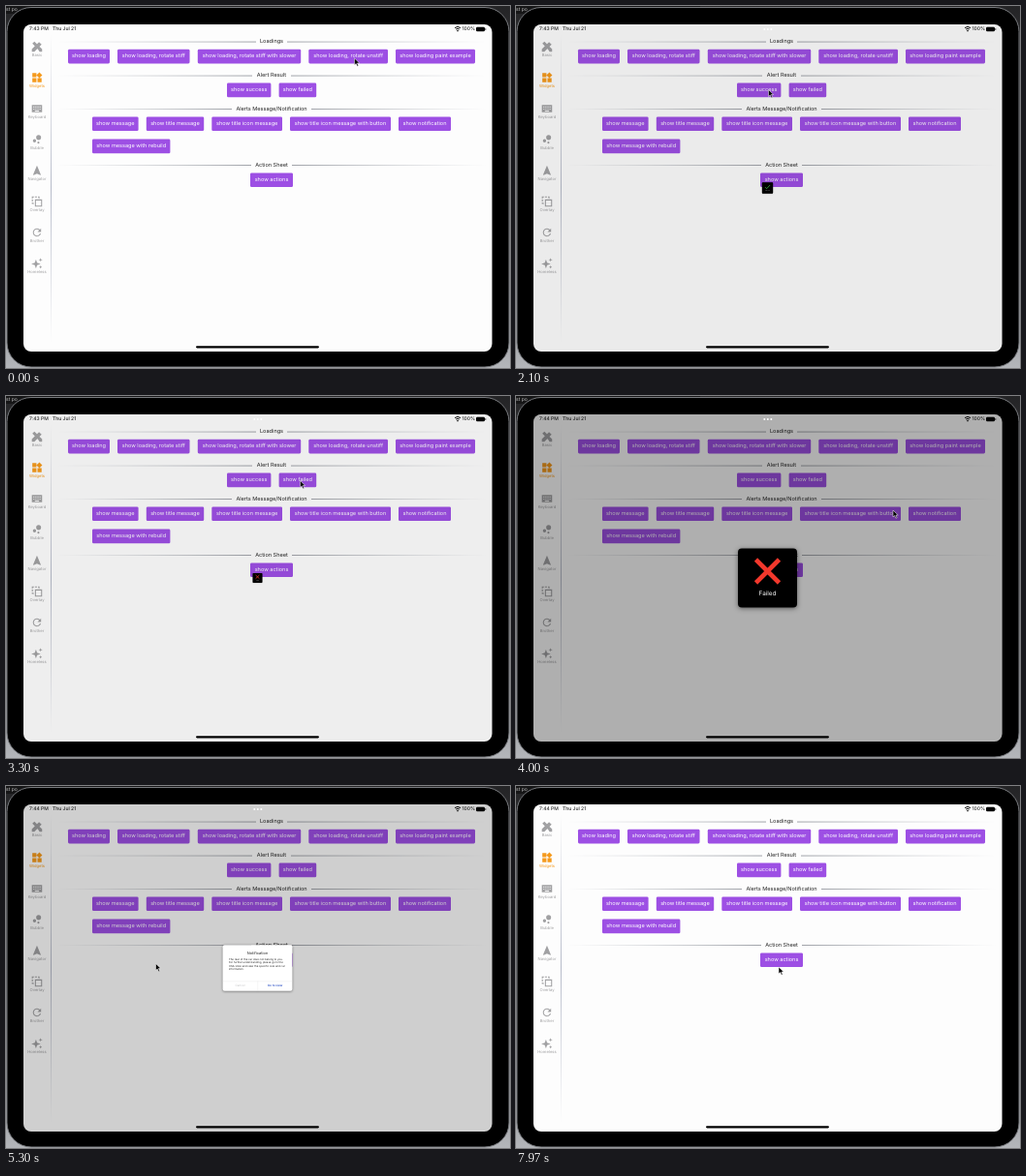
These frames come from a looping animation (520 px wide and 374 px high, 8000 ms). An HTML page:

```html
<!DOCTYPE html>
<html lang="en">
<head>
<meta charset="utf-8">
<title>Widget gallery</title>
<style>
  html, body { margin: 0; width: 100%; height: 100%; overflow: hidden; background: #222; }
  svg { display: block; width: 100vw; height: 100vh; }
  text { font-family: Inter, Roboto, sans-serif; font-size: 5.58px; dominant-baseline: central; text-rendering: geometricPrecision; }
  .popup { filter: drop-shadow(0 1px 2.5px rgba(0, 0, 0, .5)); }
</style>
</head>
<body>
<svg id="stage" viewBox="0 0 520 374">
  <defs>
    <linearGradient id="desk" x2="0" y2="1">
      <stop offset="0" stop-color="#242426"/><stop offset=".5" stop-color="#55565a"/><stop offset="1" stop-color="#b4b6ba"/>
    </linearGradient>
    <linearGradient id="fadeIn"><stop stop-color="#9aa0aa" stop-opacity="0"/><stop offset="1" stop-color="#777b84"/></linearGradient>
    <linearGradient id="fadeOut"><stop stop-color="#777b84"/><stop offset="1" stop-color="#9aa0aa" stop-opacity="0"/></linearGradient>
    <linearGradient id="fadeBoth" x2="0" y2="1">
      <stop stop-color="#a4aabc" stop-opacity="0"/><stop offset=".5" stop-color="#a4aabc"/><stop offset="1" stop-color="#a4aabc" stop-opacity="0"/>
    </linearGradient>
    <clipPath id="screenClip"><rect x="18" y="19" width="483.5" height="338" rx="8"/></clipPath>
  </defs>
  <rect width="520" height="374" fill="url(#desk)"/>
  <rect width="190" height="8" fill="#161617"/>
  <rect x="1" y="1.5" width="518" height="371.5" rx="25" fill="#000" stroke="#77797d" stroke-width="1"/>
  <text x="0" y="4" fill="#bbb" style="font-size:5px">st po</text>
  <g clip-path="url(#screenClip)">
    <rect x="18" y="19" width="484" height="338" fill="#fdfdfd"/>
    <g id="page"></g>
    <rect id="dim" x="18" y="19" width="484" height="338"/>
    <g fill="#fff"><circle cx="256.3" cy="24" r="1"/><circle cx="259.8" cy="24" r="1"/><circle cx="263.3" cy="24" r="1"/></g>
    <rect x="196" y="351.2" width="127" height="2.3" rx="1.15"/>
    <g id="popups"></g>
    <path id="cursor" d="M0 0V7L1.7 5.5 2.9 8.2 4.1 7.7 2.9 5H5.2Z" stroke="#fff" stroke-width=".5"/>
  </g>
</svg>
<script>
const LOOP = 8000;
const PURPLE = '#9d4fe4', GREY = '#a1a1a3', ORANGE = '#f59a1c', BLUE = '#3478e0';
const byId = id => document.getElementById(id);

function add(parent, tag, attrs, content = '') {
  const node = document.createElementNS('http://www.w3.org/2000/svg', tag);
  for (const key in attrs) node.setAttribute(key, attrs[key]);
  node.textContent = content;
  parent.appendChild(node);
  return node;
}

function label(parent, x, y, content, { size = 5.58, fill = '#222', anchor = 'middle', weight = 400 } = {}) {
  return add(parent, 'text', { x, y, fill, 'text-anchor': anchor, style: `font-size:${size}px;font-weight:${weight}` }, content);
}

const page = byId('page');

// Status bar
const clock = label(page, 24, 24, '', { size: 5, anchor: 'start', weight: 500 });
label(page, 48, 24, 'Thu Jul 21', { size: 5, anchor: 'start', weight: 500 });
label(page, 470.5, 24, '100%', { size: 5, anchor: 'start', weight: 500 });
add(page, 'path', { d: 'M463 22.6Q466 20.2 469 22.6M464.2 24.1Q466 22.6 467.8 24.1', fill: 'none', stroke: '#111', 'stroke-width': 1 });
add(page, 'circle', { cx: 466, cy: 25.6, r: .8 });
add(page, 'rect', { x: 485, y: 21.8, width: 9, height: 4.4, rx: 1.2 });
add(page, 'rect', { x: 494.4, y: 23.2, width: .8, height: 1.6 });

// Sidebar, icons on a 24-unit grid
const sidebar = [
  ['Basic', 'M3 6 7 2 12 7 8 11ZM13 16 17 12 22 17V22H17ZM2 17 16 3 21 8 7 22H2Z'],
  ['Widgets', 'M13 13v8h8v-8zM3 21h8v-8H3zM3 3v8h8V3zM16.7 1.7 11 7.3 16.7 13l5.6-5.7z'],
  ['Keyboard', 'M2 5H22V19H2ZM5 8V10H7V8ZM9 8V10H11V8ZM13 8V10H15V8ZM17 8V10H19V8ZM5 12V14H7V12ZM9 12V14H11V12ZM13 12V14H15V12ZM17 12V14H19V12ZM8 16V17.5H16V16Z'],
  ['Bubble', 'M4 14.4a3.2 3.2 0 1 0 6.4 0a3.2 3.2 0 1 0-6.4 0M12.8 18a2 2 0 1 0 4 0a2 2 0 1 0-4 0M10.4 8a4.8 4.8 0 1 0 9.6 0a4.8 4.8 0 1 0-9.6 0'],
  ['Navigator', 'M12 2 4.5 20.3 5.2 21 12 18 18.8 21 19.5 20.3Z'],
  ['Overlay', 'M8 8H22V22H8ZM10 10V20H20V10ZM2 2H6V4H4V6H2ZM8 2H12V4H8ZM14 2H17V6H15V4H14ZM2 8H4V12H2ZM2 14H4V15H6V17H2Z'],
  ['Brother', 'M17.7 6.3A8 8 0 1 0 19.7 14H17.6A6 6 0 1 1 16.2 7.8L13 11H20V4Z'],
  ['Homeless', 'M10 4 12.2 10.8 19 13 12.2 15.2 10 22 7.8 15.2 1 13 7.8 10.8ZM19 1 20 4 23 5 20 6 19 9 18 6 15 5 18 4ZM19 16 20 18 22 19 20 20 19 22 18 20 16 19 18 18Z'],
];
sidebar.forEach(([name, d], i) => {
  const y = 42 + i * 32, fill = name === 'Widgets' ? ORANGE : GREY;
  add(page, 'path', { d, fill, 'fill-rule': 'evenodd', transform: `translate(25.6 ${y - 6.4}) scale(.53)` });
  label(page, 32, y + 9.8, name, { size: 4.15, fill });
});
add(page, 'rect', { x: 46.2, y: 28, width: .8, height: 320, fill: 'url(#fadeBoth)' });

// Section headings: text, y, half the gap between the rules
for (const [name, y, gap] of [['Loadings', 37, 16], ['Alert Result', 72, 20], ['Alerts Message/Notification', 106.5, 41], ['Action Sheet', 164.5, 21]]) {
  add(page, 'rect', { x: 52, y: y - .3, width: 222 - gap, height: .7, fill: 'url(#fadeIn)' });
  add(page, 'rect', { x: 274 + gap, y: y - .3, width: 222 - gap, height: .7, fill: 'url(#fadeOut)' });
  label(page, 274, y, name);
}

// Buttons: top, then [left, right, text]
const buttonRows = [
  [44.8, [64, 107, 'show loading'], [115, 189.5, 'show loading, rotate stiff'], [197.8, 304.2, 'show loading, rotate stiff with slower'],
    [312.3, 394, 'show loading, rotate unstiff'], [402, 484, 'show loading paint example']],
  [79.6, [228, 273.4, 'show success'], [281.6, 320.2, 'show failed']],
  [114.4, [89, 136.6, 'show message'], [144.8, 204.2, 'show title message'], [212.3, 285, 'show title icon message'],
    [293, 397, 'show title icon message with button'], [405, 459, 'show notification']],
  [137.6, [89, 169.4, 'show message with rebuild']],
  [172.4, [252, 296, 'show actions']],
];
for (const [top, ...buttons] of buttonRows) {
  for (const [left, right, name] of buttons) {
    add(page, 'rect', { x: left, y: top, width: right - left, height: 14.7, rx: 1.4, fill: PURPLE });
    label(page, (left + right) / 2, top + 7.3, name, { fill: '#fff' });
  }
}

// Popups are drawn around their own centre
const popups = [];
function popup(open, close, width, height, fill, dims) {
  const group = add(byId('popups'), 'g', { class: 'popup' });
  add(group, 'rect', { x: -width / 2, y: -height / 2, width, height, rx: 4, fill });
  popups.push({ group, open, close, dims });
  return group;
}
function toast(open, close, text, dims) {
  const group = popup(open, close, 61, 61, '#000', dims);
  label(group, 0, 15.5, text, { size: 6.4, fill: '#fff' });
  return group;
}
function actions(group, y, bottom, left, right, size) {
  add(group, 'path', { d: `M-73 ${y}H73M.5 ${y}V${bottom}`, stroke: '#ddd', 'stroke-width': .6 });
  label(group, -36.5, (y + bottom) / 2, left[0], { size, fill: left[1] });
  label(group, 36.5, (y + bottom) / 2, right[0], { size, fill: right[1], weight: right[2] });
}

const loading = toast(60, 620, 'Loading', false);
const spinner = add(loading, 'g', {});
for (let i = 0; i < 12; i++) {
  add(spinner, 'path', { d: 'M0-5V-10', stroke: '#fff', 'stroke-width': 1.8, 'stroke-linecap': 'round', opacity: .15 + i * .07, transform: `rotate(${i * 30})` });
}
const painting = toast(900, 1480, 'Loading', false);
const arc = add(painting, 'path', { d: 'M0-10A10 10 0 1 1-10 0', fill: 'none', stroke: '#fff', 'stroke-width': 2, 'stroke-linecap': 'round' });

const success = toast(2046, 2953, 'Success', true);
add(success, 'path', { d: 'M-13-4.5-5 4 14-16', fill: 'none', stroke: '#3fae49', 'stroke-width': 4.4 });
const failed = toast(3250, 4040, 'Failed', true);
add(failed, 'path', { d: 'M-12-19 12 5M12-19-12 5', stroke: '#f2382c', 'stroke-width': 4.6 });

const notice = popup(4450, 5200, 146, 96, '#fff', true);
label(notice, 0, -31, 'Notification', { size: 8 });
['The rear of the car does not belong to you.', 'For further understanding, please go to the', 'CSA store and view the specific size and car', 'information.']
  .forEach((line, i) => label(notice, -60, -17.5 + i * 6.9, line, { anchor: 'start' }));
actions(notice, 28, 48, ['Cancel', '#c4c4c6'], ['Go to view', '#3558c8', 600], 6.2);

const hola = popup(5880, 7560, 146, 109, '#fff', false);
label(hola, 0, -43.5, 'Hola', { size: 8.2, weight: 600 });
add(hola, 'circle', { cy: -17.5, r: 13.5, fill: '#3fa142' });
add(hola, 'circle', { cy: -23.3, r: 1.7, fill: '#fff' });
add(hola, 'rect', { x: -1.4, y: -19.5, width: 2.8, height: 9.3, fill: '#fff' });
label(hola, -66, 7.5, 'A view of the sea when the author was a', { size: 6.2, anchor: 'start' });
label(hola, -66, 15.5, 'child made the author invisibly.', { size: 6.2, anchor: 'start' });
actions(hola, 33.5, 54.5, ['OK', BLUE], ['Next One', BLUE, 400], 6.4);

// Pointer path: time, x, y
const pointer = [
  [0, 359.5, 54], [300, 359.5, 54], [700, 443, 50], [1550, 443, 50], [1950, 260.5, 86.5], [2600, 260.5, 86.5],
  [2900, 303.5, 87.5], [3600, 303.5, 87.5], [3980, 389, 118], [4080, 389, 118], [4400, 174, 120], [4750, 174, 120],
  [5100, 154.5, 183.5], [5350, 154.5, 183.5], [5750, 248, 119], [6000, 248, 119], [6300, 297, 223.5],
  [7550, 297, 223.5], [7900, 271, 187], [LOOP, 271, 187],
];

const smooth = u => { u = Math.min(1, Math.max(0, u)); return u * u * (3 - 2 * u); };

function draw(t) {
  let dim = 0;
  for (const { group, open, close, dims } of popups) {
    const scale = smooth((t - open) / 200) - smooth((t - close) / 200);
    group.setAttribute('transform', `translate(259.5 188) scale(${scale})`);
    group.style.display = scale > .01 ? '' : 'none';
    if (dims) dim = Math.max(dim, .31 * Math.min(1, scale * 1.2));
  }
  byId('dim').setAttribute('opacity', dim);
  spinner.setAttribute('transform', `translate(0 -7) rotate(${t * .45})`);
  arc.setAttribute('transform', `translate(0 -7) rotate(${t * .6})`);
  clock.textContent = t < 3500 ? '7:43 PM' : '7:44 PM';

  const i = pointer.findIndex(p => p[0] > t);
  const [t0, x0, y0] = pointer[i - 1], [t1, x1, y1] = pointer[i];
  const u = smooth((t - t0) / (t1 - t0));
  byId('cursor').setAttribute('transform', `translate(${x0 + (x1 - x0) * u} ${y0 + (y1 - y0) * u})`);
}

const start = performance.now();
function tick() {
  draw((performance.now() - start) % LOOP);
  requestAnimationFrame(tick);
}
tick();
</script>
</body>
</html>
```
